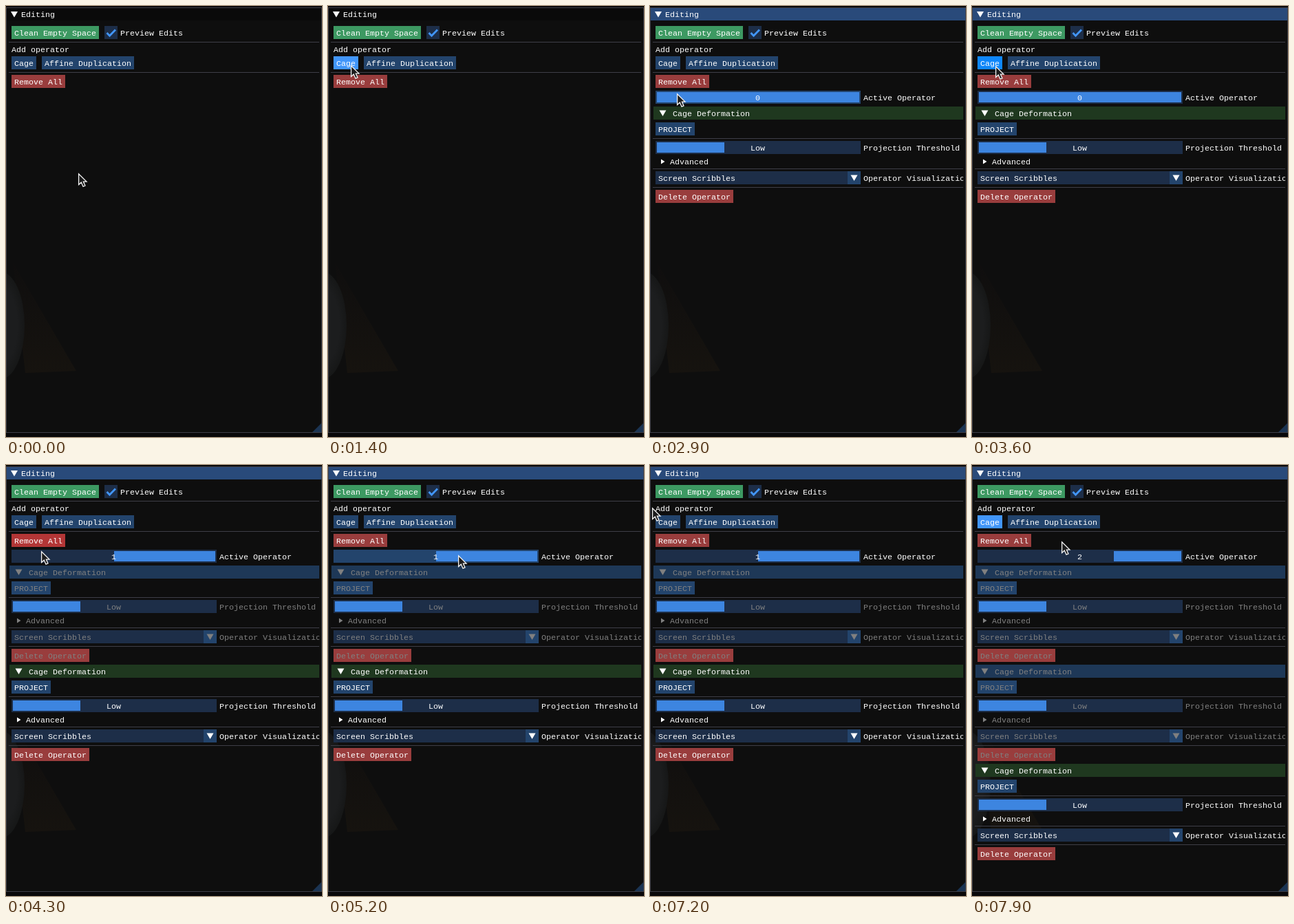
These frames come from a looping animation (459x626 px, 8000 ms). An HTML page:

```html
<!DOCTYPE html>
<html lang="en">
<head>
<meta charset="utf-8">
<title>Editing panel</title>
<style>
  html, body { margin: 0; width: 100%; height: 100%; overflow: hidden; background: #09080a; }
  svg { display: block; width: 459px; height: 626px; }
  text { font: 11.667px "Liberation Mono", "DejaVu Sans Mono", monospace; fill: currentColor; white-space: pre; }
  svg { color: #fff; }
  .sep { fill: #3e3e47; }
  .btn { fill: #23446c; }
  .btn.hot { fill: #4296fa; }
  .btn.held { fill: #0f87fa; }
  .green { fill: #3d9962; }
  .red { fill: #993d3d; }
  .red.hot { fill: #b33636; }
  .frame { fill: #1d2e48; }
  .frame.hot { fill: #23446c; }
  .frame.held { fill: #3169ac; }
  .grab { fill: #3d85e0; }
  .held + .grab { fill: #4296fa; }
  .arrow { fill: currentColor; }
  .title { fill: #0a0a0a; }
  .title.on { fill: #294a7a; }
  .op { color: #808080; }
  .op.on { color: #fff; }
  .head { fill: #1e3857; }
  .head.hot { fill: #387bcb; }
  .on .head { fill: #1f381f; }
</style>
</head>
<body>
<svg id="stage" viewBox="0 0 459 626"></svg>
<script>
const LOOP = 8000, STEP = 100, OP_HEIGHT = 144;

const rect = (x, y, w, h, cls, id = '') =>
  `<rect ${id && `id="${id}"`} class="${cls}" x="${x}" y="${y}" width="${w}" height="${h}"/>`;
const text = (x, y, s, id = '') => `<text ${id && `id="${id}"`} x="${x}" y="${y}">${s}</text>`;
const sep = y => rect(4, y, 451, 1, 'sep');
const button = (x, y, label, cls, id) =>
  rect(x, y, label.length * 7 + 8, 19, cls, id) + text(x + 4, y + 14, label);
const down = (x, y) => `<path class="arrow" d="M${x} ${y}h10l-5 8.5z"/>`;

// One operator block, laid out relative to its header.
const operator = i => `<g class="op" id="op${i}" transform="translate(0 ${146 + i * OP_HEIGHT})">
  ${rect(5, 0, 450, 19, 'head', 'head' + i)}${down(13.5, 5.5)}${text(33, 14, 'Cage Deformation')}
  ${button(8, 23, 'PROJECT', 'btn')}${sep(46)}
  ${rect(8, 50, 298, 19, 'frame')}${rect(10, 52, 98, 15, 'grab')}
  ${text(146, 64, 'Low')}${text(310, 64, 'Projection Threshold')}
  <path class="arrow" d="M16 76.5v7l5.5-3.5z"/>${text(29, 84, 'Advanced')}${sep(90)}
  ${rect(8, 94, 279, 19, 'frame')}${rect(287, 94, 19, 19, 'btn')}${down(291.5, 99.5)}
  ${text(12, 108, 'Screen Scribbles')}${text(310, 108, 'Operator Visualization')}${sep(117)}
  ${button(8, 121, 'Delete Operator', 'red')}
</g>`;

const stage = document.getElementById('stage');
stage.innerHTML = `
  <defs>
    <clipPath id="inner"><rect width="455" height="619"/></clipPath>
    <clipPath id="win"><rect y="2" width="459" height="618"/></clipPath>
    <linearGradient id="tan" x1="0" y1="0" x2="0" y2="1">
      <stop offset="0" stop-color="#0f0e0e"/><stop offset="1" stop-color="#16130f"/>
    </linearGradient>
    <radialGradient id="orb"><stop offset=".7" stop-color="#1c1d1e"/><stop offset="1" stop-color="#161717"/></radialGradient>
  </defs>
  <rect y="2" width="459" height="618" fill="#0e0e0e"/>
  <g clip-path="url(#win)">
    <path d="M10 372L102 530L28 533Z" fill="url(#tan)"/>
    <ellipse cx="-8" cy="464" rx="35" ry="78" fill="url(#orb)"/>
    <path d="M459 605v15h-15z" fill="#1b3453"/>
  </g>
  ${rect(0, 2, 459, 19, 'title', 'title')}
  <rect x=".5" y="2.5" width="458" height="617" fill="none" stroke="#3e3e47"/>
  ${down(7, 8)}${text(22, 16, 'Editing')}
  ${button(8, 29, 'Clean Empty Space', 'green')}
  ${rect(143, 29, 19, 19, 'frame')}
  <path d="M146.5 39l4 4.2 8.5-8.7" fill="none" stroke="#4296fa" stroke-width="2.8"/>
  ${text(166, 43, 'Preview Edits')}${sep(52)}
  ${text(8, 67, 'Add operator')}
  ${button(8, 73, 'Cage', 'btn', 'cage')}${button(52, 73, 'Affine Duplication', 'btn', 'affine')}${sep(96)}
  ${button(8, 100, 'Remove All', 'red', 'remove')}
  <g id="ops" clip-path="url(#inner)">
    ${rect(8, 123, 298, 19, 'frame', 'slider')}${rect(10, 125, 294, 15, 'grab', 'grab')}
    ${text(153, 137, '0', 'value')}${text(310, 137, 'Active Operator')}
    ${[0, 1, 2].map(operator).join('')}
  </g>
  <path id="cursor" d="M.6 .8V16.6L4.3 13.2L7 19.2L10 17.9L7.4 12.1H12Z"
    fill="#1c1c1c" stroke="#f2f2f2" stroke-width="1.3"/>`;

const el = id => document.getElementById(id);

// Pointer path: time, x, y.
const path = [
  [0, 105, 243], [300, 105, 243], [600, 108, 215], [1000, 92, 112], [1100, 72, 90], [1200, 36, 86],
  [1400, 33, 86], [2000, 33, 86], [2200, 35, 112], [2300, 38, 125], [2400, 39, 131], [2500, 39, 131],
  [2900, 39, 127], [3100, 37, 108], [3300, 34, 88], [3400, 34, 87], [4000, 34, 87], [4200, 44, 108],
  [4300, 51, 125], [4500, 75, 148], [4900, 150, 155], [5100, 181, 138], [5200, 189, 131], [5400, 190, 132],
  [5600, 150, 132], [5800, 105, 130], [5900, 105, 130], [6100, 165, 126], [6300, 243, 122], [6500, 243, 122],
  [6800, 150, 95], [7100, 30, 56], [7200, 3, 62], [7300, 20, 78], [7400, 25, 80], [7800, 27, 82], [7900, 130, 111]
];

function pointer(t) {
  const i = path.findIndex(p => p[0] > t);
  if (i < 0) return path[path.length - 1].slice(1);
  if (i === 0) return path[0].slice(1);
  const [t0, x0, y0] = path[i - 1], [t1, x1, y1] = path[i];
  const k = (t - t0) / (t1 - t0);
  return [x0 + (x1 - x0) * k, y0 + (y1 - y0) * k];
}

const between = (t, a, b) => t >= a && t < b;

function draw(t) {
  const [x, y] = pointer(t);
  // Widgets react one step after the pointer moves.
  const [hx, hy] = pointer(Math.max(0, t - STEP));
  const over = (l, top, r) => hx >= l && hx < r && hy >= top - 1 && hy < top + 19;
  const mark = (id, hot, held = false) => {
    el(id).classList.toggle('hot', hot);
    el(id).classList.toggle('held', held);
  };

  const count = [1700, 3800, 7700].filter(s => t >= s).length;
  const dragging = between(t, 5400, 6400);
  const active = dragging && x < 157 ? 0 : Math.max(0, count - 1);
  const pressed = between(t, 1600, 1700) || between(t, 3600, 3800) || between(t, 7500, 7700);

  el('cursor').setAttribute('transform', `translate(${Math.round(x)} ${Math.round(y)})`);
  el('title').classList.toggle('on', t >= 1600);
  mark('cage', over(8, 73, 44), pressed);
  mark('affine', over(52, 73, 186));
  mark('remove', over(8, 100, 86));
  mark('slider', over(8, 123, 306), dragging);
  mark('head0', !dragging && active > 0 && over(5, 146, 455));

  el('ops').style.display = count ? '' : 'none';
  const width = 294 / Math.max(1, count);
  el('grab').setAttribute('x', Math.round(10 + width * active));
  el('grab').setAttribute('width', Math.round(width));
  el('value').textContent = active;
  for (let i = 0; i < 3; i++) {
    el('op' + i).style.display = i < count ? '' : 'none';
    el('op' + i).classList.toggle('on', i === active);
  }
}

const start = performance.now();
function tick() {
  const t = (performance.now() - start) % LOOP;
  draw(Math.floor(t / STEP) * STEP);
  requestAnimationFrame(tick);
}
tick();
</script>
</body>
</html>
```
